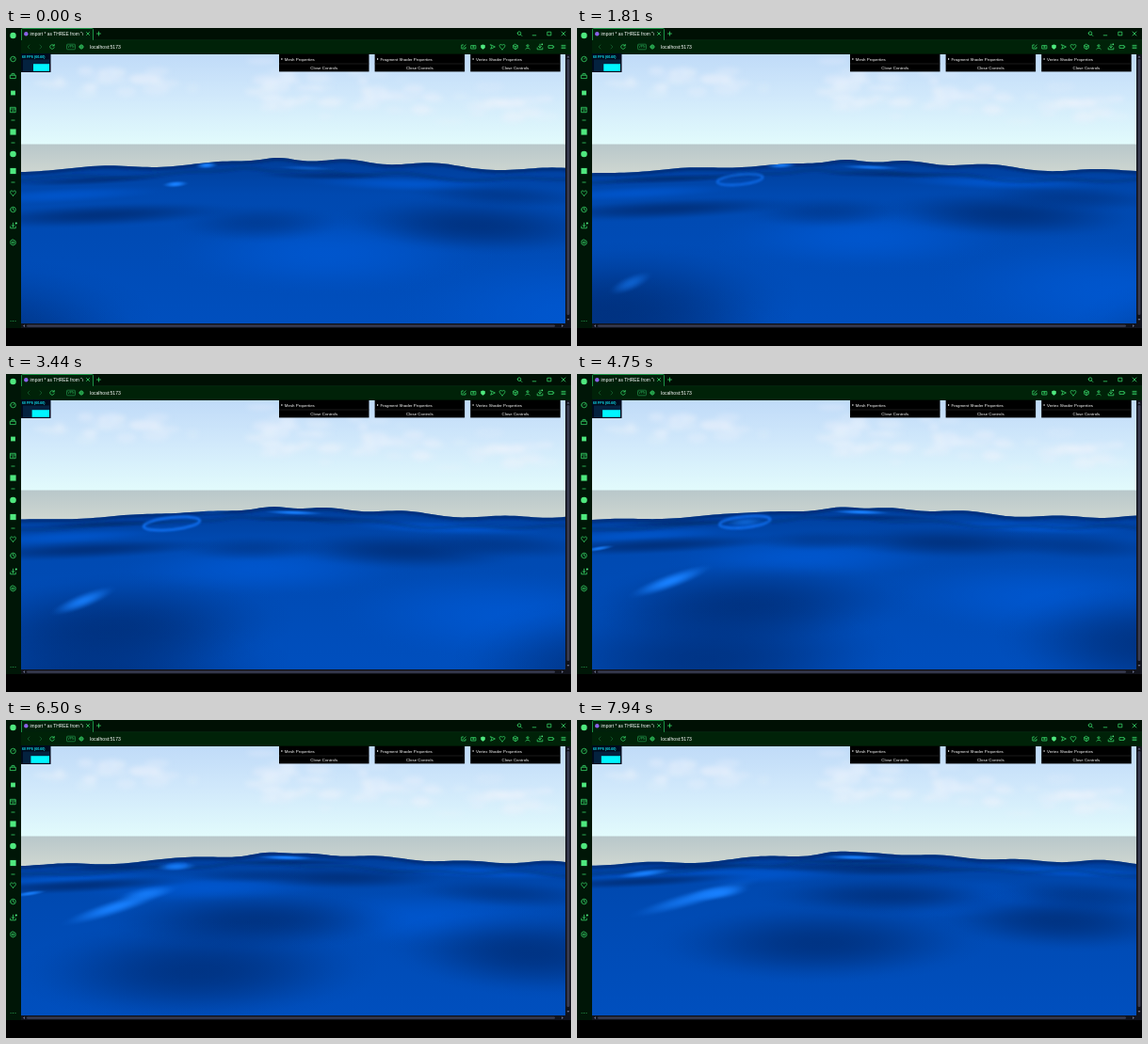
Write an HTML page that moves like this. It is 600 px wide and 338 px high and loops after 8 s.

```html
<!DOCTYPE html>
<html lang="en">
<head>
<meta charset="utf-8">
<title>Ocean shader</title>
<style>
  html, body { margin: 0; width: 100%; height: 100%; overflow: hidden; background: #000; }
  svg { display: block; width: 100%; height: 100%; }
  text { font-family: "Liberation Sans", Arial, sans-serif; fill: #fff; }
  .ico { fill: none; stroke: #36d468; stroke-width: .8; stroke-linecap: round; stroke-linejoin: round; }
  .dim { stroke: #14602f; }
  .solid { fill: #4fe87f; stroke: none; }
</style>
</head>
<body>
<svg viewBox="0 0 600 338">
  <defs>
    <linearGradient id="sky" x1="0" y1="0" x2="0" y2="1">
      <stop offset="0" stop-color="#c0dbf8"/>
      <stop offset=".45" stop-color="#d0e8fb"/>
      <stop offset="1" stop-color="#e2fbfc"/>
    </linearGradient>
    <linearGradient id="haze" x1="0" y1="0" x2="0" y2="1">
      <stop offset="0" stop-color="#b8c7ca"/>
      <stop offset="1" stop-color="#d2d9d2"/>
    </linearGradient>
    <linearGradient id="water" gradientUnits="userSpaceOnUse" x1="0" y1="138" x2="0" y2="314">
      <stop offset="0" stop-color="#003d98"/>
      <stop offset=".22" stop-color="#0049b0"/>
      <stop offset="1" stop-color="#004fbe"/>
    </linearGradient>
    <filter id="soft" x="-30%" y="-30%" width="160%" height="160%"><feGaussianBlur stdDeviation="2.5"/></filter>
    <filter id="thin" x="-30%" y="-60%" width="160%" height="220%"><feGaussianBlur stdDeviation="1.1"/></filter>
    <clipPath id="page"><rect x="16" y="28" width="578" height="286"/></clipPath>
    <clipPath id="tab"><rect x="16" y="0" width="66" height="13"/></clipPath>
    <clipPath id="seaClip"><path id="seaEdge"/></clipPath>
  </defs>

  <rect width="600" height="338" fill="#000"/>

  <g clip-path="url(#page)">
    <rect x="16" y="28" width="578" height="96" fill="url(#sky)"/>
    <g id="clouds" filter="url(#soft)" fill="#edf3fc"></g>
    <rect x="16" y="123.5" width="578" height="36" fill="url(#haze)"/>
    <g clip-path="url(#seaClip)">
      <rect x="16" y="130" width="578" height="186" fill="url(#water)"/>
      <g id="shade"></g>
      <g fill="none" stroke="#00296c" filter="url(#thin)">
        <path id="ridge" transform="translate(-34 11)" stroke-width="4" opacity=".3"/>
        <path id="crest" stroke-width="7" opacity=".6"/>
      </g>
      <g id="shine"></g>
      <ellipse id="ring" fill="none" stroke="#1478ff" stroke-width="2.6" filter="url(#thin)"/>
    </g>
  </g>

  <!-- browser frame -->
  <rect width="600" height="13" fill="#001004"/>
  <rect y="13" width="600" height="15" fill="#002208"/>
  <rect width="16" height="319" fill="#001607"/>
  <path d="M16.5 13V1.5Q16.5.5 17.5.5H91.5Q92.5.5 92.5 1.5V13" fill="#00200a" stroke="#1fa04d" stroke-width=".9"/>
  <path d="M92.5 12.7H600" stroke="#0b3a1c" stroke-width=".5"/>
  <circle cx="21.3" cy="6.2" r="2.2" fill="#8a63e8"/>
  <g clip-path="url(#tab)"><text x="25.5" y="8" font-size="4.9">import * as THREE from "c</text></g>
  <path class="ico" d="M85.5 4.5l3 3m0-3l-3 3M96.5 6h4m-2-2v4"/>
  <g id="bar"></g>
  <rect x="64.5" y="17.2" width="9" height="5.6" rx="1" fill="none" stroke="#2fbf62" stroke-width=".5"/>
  <text x="69" y="21.4" font-size="3.4" text-anchor="middle" style="fill:#2fbf62">VPN</text>
  <text x="89" y="22" font-size="5.1">localhost:5173</text>
  <g id="side"></g>

  <!-- scrollbars -->
  <rect x="594" y="28" width="6" height="291" fill="#11131c"/>
  <rect x="595.6" y="33" width="2.8" height="272" rx="1.2" fill="#3a3d52"/>
  <rect x="16" y="314" width="584" height="5" fill="#11131c"/>
  <rect x="22" y="315.4" width="561" height="2.4" rx="1.2" fill="#3a3d52"/>
  <path d="M20 315.2v2.8l-2-1.4zM590 315.2v2.8l2-1.4zM595.6 31.5h2.8l-1.4-2zM595.6 309h2.8l-1.4 2z" fill="#6a6e88"/>

  <!-- frame counter -->
  <rect x="16" y="27" width="31.5" height="20" fill="#000a1c"/>
  <rect x="18" y="33.5" width="28" height="12.5" fill="#04223f"/>
  <text x="17" y="31.7" font-size="3.6" font-weight="bold" style="fill:#0ee6f5">60 FPS (60-60)</text>
  <rect id="graph" y="38.2" height="7.6" fill="#00f6ff"/>

  <g id="panels"></g>
</svg>
<script>
const NS = 'http://www.w3.org/2000/svg';
const LOOP = 8000, STEP = 62.5;
const $ = id => document.getElementById(id);
const mix = (a, b, u) => a + (b - a) * u;
const bump = (x, center, width) => Math.exp(-(((x - center) / width) ** 2));

function add(parent, tag, attrs, text) {
  const el = document.createElementNS(NS, tag);
  for (const k in attrs) el.setAttribute(k, attrs[k]);
  if (text) el.textContent = text;
  parent.appendChild(el);
  return el;
}
function icon(parent, x, y, d, cls = '') {
  add(parent, 'path', { class: 'ico ' + cls, transform: `translate(${x} ${y})`, d });
}

// --- static interface -------------------------------------------------
const circle = r => `M${-r} 0a${r} ${r} 0 1 0 ${2 * r} 0a${r} ${r} 0 1 0 ${-2 * r} 0`;
const box = r => `M${-r} ${-r}h${2 * r}v${2 * r}h${-2 * r}z`;
const heart = 'M0 2.7C-5-.6-2.6-4.2 0-1.6C2.6-4.2 5-.6 0 2.7z';
const down = 'M0-2.8V1m-1.6-1.5L0 1l1.6-1.5M-2.8 1v1.8h5.6V1';
const dash = 'M-1.6 0h3.2';

const bar = $('bar'), side = $('side');
icon(bar, 24, 20, 'M1-2l-2 2 2 2', 'dim');
icon(bar, 37, 20, 'M-1-2l2 2-2 2', 'dim');
icon(bar, 49, 20, 'M2 -1.2A2.3 2.3 0 1 0 2.2 .8M2.2-2.6v1.6h-1.6');
icon(bar, 80, 20, circle(2) + 'M-2 0h4M0-2v4');
icon(bar, 545, 5.6, circle(1.8) + 'M1.3 1.3l1.5 1.5');
icon(bar, 561, 7.8, 'M-1.8 0h3.6');
icon(bar, 577, 6, box(1.8));
icon(bar, 592, 6, 'M-2-2l4 4m0-4l-4 4');
icon(bar, 486, 20, 'M-.5-2h-1.7v4h4.2v-1.6M-.4 .5l2.6-2.6');
icon(bar, 496.5, 20, 'M-2.4-1.4h4.8v3.4h-4.8z' + circle(.7));
icon(bar, 506.5, 20, 'M0-2.6l2.3.8v2Q2 2 0 2.8Q-2 2-2.3 .2v-2z', 'solid');
icon(bar, 517, 20, 'M-2.3-2.2L2.4 0l-4.7 2.2L-1.3 0z');
icon(bar, 527, 20, heart);
icon(bar, 541, 20, 'M0-2.6l2.3 1.3v2.6L0 2.6l-2.3-1.3v-2.6zM-2.3-1.3L0 0l2.3-1.3M0 0v2.6');
icon(bar, 554, 20, 'M-2.2 2.4Q0-.4 2.2 2.4M-1.1-1.2a1.1 1.1 0 1 0 2.2 0a1.1 1.1 0 1 0-2.2 0');
icon(bar, 567, 20, down);
icon(bar, 569.3, 17.3, circle(.9), 'solid');
icon(bar, 579, 20, 'M-2.6-1.4h4.6v2.8h-4.6zM2.7-.5v1');
icon(bar, 592, 20, 'M-2-1.6h4M-2 0h4M-2 1.6h4');

icon(side, 7.5, 8, circle(3.2), 'solid');
icon(side, 7.5, 33, circle(2.8) + 'M0 0l1.3-1.4');
icon(side, 7.5, 51, 'M-2.8-.8h5.6v3.4h-5.6zM-1.4-.8v-1.8h2.8v1.8');
icon(side, 7.5, 69, box(2.4), 'solid');
icon(side, 7.5, 87, box(2.7) + 'M-2.7-1h5.4M-1 1h2');
icon(side, 7.5, 98, dash);
icon(side, 7.5, 110.5, box(3.1), 'solid');
icon(side, 7.5, 122, dash);
icon(side, 7.5, 134, circle(3.3), 'solid');
icon(side, 7.5, 152, box(3.1), 'solid');
icon(side, 7.5, 164, dash);
icon(side, 7.5, 175.5, heart);
icon(side, 7.5, 193, circle(2.8) + 'M0-1.6V0l1.2.8');
icon(side, 7.5, 210, down);
icon(side, 10.8, 207.5, circle(1.1), 'solid');
icon(side, 7.5, 228, circle(1) + 'M0-3l2.6 1.5v3L0 3l-2.6-1.5v-3z');
icon(side, 7.5, 311.5, 'M-2.4 0h.1M0 0h.1M2.4 0h.1');

['Mesh', 'Fragment Shader', 'Vertex Shader'].forEach((name, i) => {
  const x = 290 + i * 101.6, g = $('panels');
  add(g, 'rect', { x, y: 27.6, width: 95.5, height: 18.8, fill: '#000' });
  add(g, 'path', { d: `M${x} 38h95.5`, stroke: '#2c2c2c', 'stroke-width': .6 });
  add(g, 'path', { d: `M${x + 2.4} 32l1.6 1-1.6 1z`, fill: '#fff' });
  add(g, 'text', { x: x + 5.8, y: 34.5, 'font-size': 4.4 }, name + ' Properties');
  add(g, 'text', { x: x + 47.7, y: 43.8, 'font-size': 4.4, 'text-anchor': 'middle' }, 'Close Controls');
});

// Clouds: random puffs scattered around a few centres.
let seed = 7;
const random = () => (seed = seed * 16807 % 2147483647) / 2147483647;
const scatter = () => random() + random() - 1;
function cloud(x, y, width, height) {
  for (let i = 0; i < 24; i++) {
    add($('clouds'), 'ellipse', {
      cx: x + scatter() * width, cy: y + scatter() * height,
      rx: 5 + random() * 11, ry: 2 + random() * 4, opacity: .12 + random() * .3
    });
  }
}
cloud(296, 66, 48, 40);
cloud(385, 72, 75, 34);
cloud(520, 80, 75, 24);
cloud(110, 58, 95, 18);

// --- motion: u runs from 0 to 1 over the loop ---------------------------
// Peaks on the skyline travel sideways while their height changes.
const peaks = [];
const peak = (from, to, rise, end, width) => peaks.push({ from, to, rise, end, width });
peak(0, 80, -1, 4, 36);
peak(105, 180, 5.5, 3, 48);
peak(225, 205, 4.5, 3.5, 48);
peak(290, 273, 5, 5, 24);
peak(362, 310, 5.2, 4.5, 32);
peak(455, 385, 6.5, 5, 40);
peak(580, 470, 4, 5, 40);
peak(670, 555, 5, 6, 36);

function skyline(x, u) {
  const level = 152.5 + 2.5 * u + 2 * Math.sin(Math.PI * u);
  return peaks.reduce(
    (y, p) => y - mix(p.rise, p.end, u) * bump(x, mix(p.from, p.to, u), p.width),
    level - 9 * bump(x, 310, 130));
}

function glow(id, color) {
  const g = add(document.querySelector('defs'), 'radialGradient', { id });
  for (let r = 0; r <= 1; r += .125) {
    add(g, 'stop', { offset: r, 'stop-color': color, 'stop-opacity': (1 - r * r) ** 2 });
  }
  return `url(#${id})`;
}
const DARK = glow('dark', '#002c74');
const LIGHT = glow('light', '#0058d2');
const GLINT = glow('glint', '#1880ff');

function place(el, x, y, rx, ry, tilt, alpha) {
  el.setAttribute('transform', `translate(${x.toFixed(2)} ${y.toFixed(2)}) rotate(${tilt.toFixed(2)})`);
  el.setAttribute('rx', rx.toFixed(2));
  el.setAttribute('ry', ry.toFixed(2));
  el.setAttribute('opacity', alpha.toFixed(3));
}

const moves = [];

// A swell rolls towards the horizon; its size follows from its distance.
function swell(fill, from, to, wide = 1, thick = 1, alpha = .75) {
  const el = add($('shade'), 'ellipse', { fill });
  moves.push(u => {
    const x = mix(from[0], to[0], u), y = mix(from[1], to[1], u), near = y - 138;
    place(el, x, y, wide * (60 + 9 * Math.sqrt(near)), thick * .44 * near, (300 - x) * -.012, alpha);
  });
}

// Fades in and out between two moments of the loop.
function fade(u, [born, gone]) {
  const k = (u - born) / (gone - born);
  return k > 0 && k < 1 ? Math.sin(Math.PI * k) ** .6 : 0;
}

// A glint slows down along its way and stretches from one length to another.
function glint(from, to, length, ry, tilt, life) {
  const el = add($('shine'), 'ellipse', { fill: GLINT });
  moves.push(u => {
    const e = 1 - (1 - u) ** 1.5;
    place(el, mix(from[0], to[0], e), mix(from[1], to[1], e),
      mix(length[0], length[1], u), ry, mix(tilt, tilt * .6, u), fade(u, life));
  });
}

swell(LIGHT, [340, 240], [180, 164], 1.2, 1, .8);
swell(LIGHT, [620, 310], [420, 190], 1.2, 1, .8);
swell(LIGHT, [60, 178], [70, 167], 1, .5, .7);
swell(LIGHT, [430, 166], [520, 161], 1.1, .7, .8);

swell(DARK, [-60, 330], [340, 186], 1.2);
swell(DARK, [-40, 400], [260, 236], 1.2);
swell(DARK, [500, 210], [320, 158], 1.1);
swell(DARK, [760, 400], [510, 212]);
swell(DARK, [525, 178], [535, 186], .9, .8, .5);
swell(DARK, [100, 199], [70, 171], 1.2, .5, .8);
swell(DARK, [90, 162], [125, 156], .9, .5, .7);
swell(DARK, [340, 157], [300, 150], .8, .6, .7);
swell(DARK, [270, 208], [250, 156], .7, .7, .45);

glint([25, 310], [125, 189], [12, 74], 9, -26, [.1, 1.25]);
glint([150, 188], [150, 184], [30, 36], 8, -14, [.7, 1.2]);
glint([14, 190], [26, 184], [16, 20], 3, -12, [.45, .97]);
glint([72, 163], [72, 163], [32, 32], 4.5, -11, [.9, 1.15]);
glint([213, 146], [225, 146], [13, 36], 4, -3, [-.3, .45]);
glint([180, 166], [180, 165], [15, 15], 4, -4, [-.2, .2]);
glint([170, 164], [182, 155], [22, 24], 5.5, -4, [.55, .92]);
glint([320, 149], [295, 146], [34, 34], 3, 2, [-.1, 1.5]);

moves.push(u => {
  const size = fade(u, [.04, .84]);
  place($('ring'), mix(170, 184, u), mix(163.5, 153, u), 3 + 27 * size, .5 + 6 * size, -6, .9 * size);
});

function draw(u) {
  let edge = '';
  for (let x = -20; x <= 660; x += 5) edge += `${edge ? 'L' : 'M'}${x} ${skyline(x, u).toFixed(2)}`;
  $('seaEdge').setAttribute('d', edge + 'V316H-20Z');
  $('crest').setAttribute('d', edge);
  $('ridge').setAttribute('d', edge);
  moves.forEach(move => move(u));
  const left = 29 - 3.2 * u;
  $('graph').setAttribute('x', left);
  $('graph').setAttribute('width', 46 - left);
}

const start = performance.now();
function tick() {
  const t = (performance.now() - start) % LOOP;
  draw(Math.floor((t + 4) / STEP) * STEP % LOOP / LOOP);
  requestAnimationFrame(tick);
}
tick();
</script>
</body>
</html>
```
